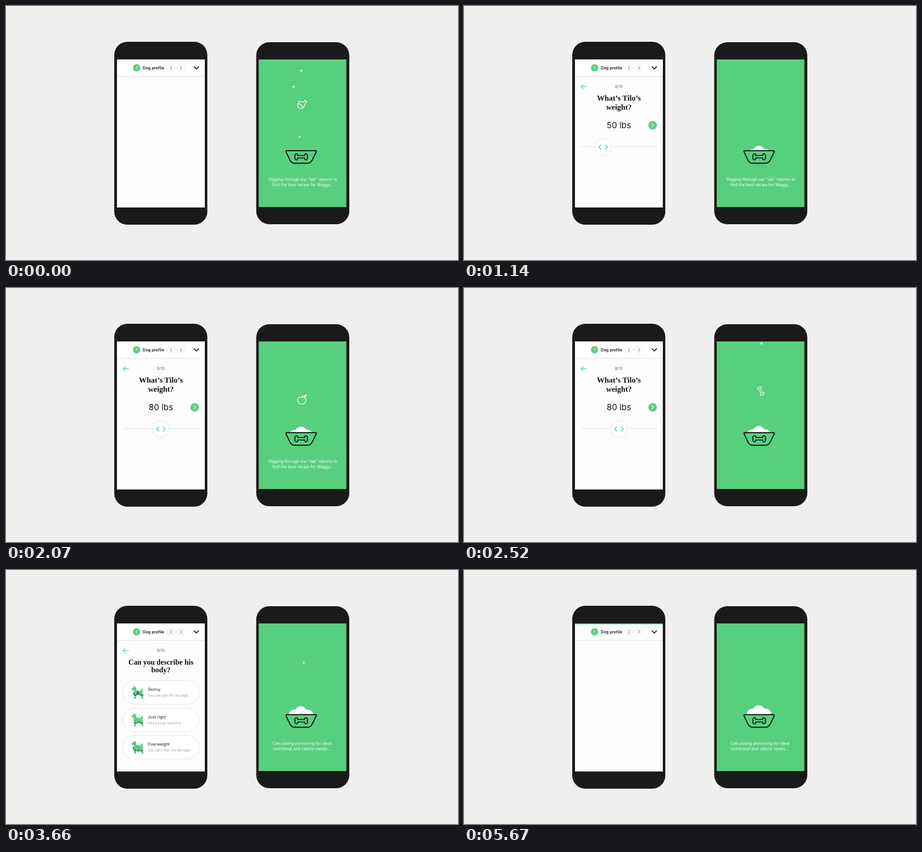
Write an HTML page that moves like this. It is 998 px wide and 561 px high and loops after 5.76 s.

```html
<!DOCTYPE html>
<html lang="en">
<head>
<meta charset="utf-8">
<title>Dog profile</title>
<style>
  html, body { margin: 0; width: 100%; height: 100%; overflow: hidden; background: #f0efed; }
  svg { display: block; width: 100%; height: 100%; }
  text { font: 400 8.6px Inter, "Open Sans", sans-serif; letter-spacing: .18px; fill: #1a1a1a; }
  .mid { text-anchor: middle; }
  .step { font-size: 8.5px; fill: #666; letter-spacing: 0; }
  .title { font: 700 17px "Liberation Serif", serif; letter-spacing: 0; fill: #111; }
  .small { font-size: 16.2px; }
  .value { font-size: 18.5px; letter-spacing: 0; }
  .hint { font-size: 7.5px; letter-spacing: .05px; fill: #a3a3a3; }
  .note text { fill: #fff; }
  .line { fill: none; stroke-linecap: round; stroke-linejoin: round; }
  .food { stroke: #fff; stroke-width: 1.4; }
</style>
</head>
<body>
<svg viewBox="0 0 998 561" preserveAspectRatio="xMidYMid meet">
  <defs>
    <clipPath id="left"><rect x="245" y="156" width="194" height="289"/></clipPath>
    <clipPath id="air"><rect x="558" y="118" width="193.5" height="202"/></clipPath>
    <path id="bone" d="M-8-2.7H8C6.5-6.5 11-8.6 12.6-5.2C15-4.6 14.8-1 13 0C14.8 1 15 4.6 12.6 5.2C11 8.6 6.5 6.5 8 2.7H-8C-6.5 6.5-11 8.6-12.6 5.2C-15 4.6-14.8 1-13 0C-14.8-1-15-4.6-12.6-5.2C-11-8.6-6.5-6.5-8-2.7z"/>
    <path id="dog" fill="#5ccf85" stroke="#5ccf85" stroke-width=".6" stroke-linejoin="round" d="M7 0l3 4 .5 5 10 2 2-5 2.2.5-.7 7 1.5 5-1 4 2 5.5H23l-1-5-3.5-4h-7l-2 4v5h-4L7 23l-2-5 .5-6L5 9 .5 8.5V6l3-2.5z"/>
  </defs>
  <rect width="998" height="561" fill="#f0efed"/>

  <rect x="239" y="79" width="205.5" height="404" rx="29" fill="#1a1a1a"/>
  <rect x="245" y="118" width="194" height="327" fill="#fdfdfd"/>
  <rect x="245" y="118" width="194" height="37.5" fill="#fff"/>
  <path d="M245 155.5H439" stroke="#dcdcdc"/>
  <circle cx="288.3" cy="136.5" r="8" fill="#5ccf85"/>
  <g fill="#fff" stroke="#dcdcdc" stroke-width=".9">
    <path d="M372 136.5H378"/>
    <circle cx="364" cy="136.5" r="7.8"/><circle cx="386" cy="136.5" r="7.8"/>
  </g>
  <text class="step mid" x="288.3" y="139.7" style="fill:#fff">1</text>
  <text x="302" y="139.8" style="font-size:8.8px;font-weight:600;letter-spacing:.05px">Dog profile</text>
  <text class="step mid" x="364" y="139.7">2</text>
  <text class="step mid" x="386" y="139.7">3</text>
  <path class="line" d="M415.3 134.2l4.9 5 4.9-5" stroke="#1a1a1a" stroke-width="2"/>
  <rect id="bar" x="245" y="118" height="2" fill="#58cf7f"/>

  <g clip-path="url(#left)">
    <g id="back">
      <path class="line" d="M270.5 178.3H258.5M263.3 173.6L258.5 178.3L263.3 183" stroke="#5ccf85" stroke-width="1.4"/>
      <text id="count" class="step mid" x="342" y="181"></text>
    </g>
    <g id="weight">
      <text class="title mid" x="342" y="209">What’s Tilo’s</text>
      <text class="title mid" x="342" y="229">weight?</text>
      <text id="lbs" class="value mid" x="342" y="270"></text>
      <circle cx="416.5" cy="263.5" r="9.4" fill="#5ccf85"/>
      <path class="line" d="M414.7 259.7l3.8 3.8-3.8 3.8" stroke="#fff" stroke-width="1.4"/>
      <path d="M258.500 310.500H425.500" stroke="#dcdcdc" stroke-width="1.1"/>
      <g id="knob">
        <circle r="18.5" fill="#fff" stroke="#dcdcdc" stroke-width=".9"/>
        <path class="line" d="M-4.800-4.600L-9.300 0l4.500 4.600M4.800-4.600L9.300 0l-4.500 4.600" stroke="#3cbf8a" stroke-width="1.5"/>
      </g>
    </g>
    <g id="body">
      <text class="title small mid" x="342" y="209">Can you describe his</text>
      <text class="title small mid" x="342" y="226">body?</text>
      <g id="options"></g>
    </g>
  </g>

  <rect x="552.5" y="80" width="205.500" height="402" rx="29" fill="#1a1a1a"/>
  <rect x="558" y="118" width="193.500" height="326" fill="#58cf7f"/>
  <g clip-path="url(#air)">
    <g id="drops"></g>
    <g id="mound" fill="#fff">
      <circle cx="651" cy="312" r="13.200"/>
      <circle cx="638" cy="320" r="14"/><circle cx="665" cy="320" r="14"/>
      <rect x="638" y="312" width="27" height="30"/>
    </g>
  </g>
  <path d="M620.500 319.500H682.800Q686 319.500 684.800 322.500L676 340.500Q672.500 347.200 665.500 347.200H637.500Q630.500 347.200 627 340.500L618.500 322.500Q617.300 319.500 620.500 319.500z" fill="#58cf7f" stroke="#161a18" stroke-width="2.500"/>
  <use href="#bone" class="line" x="651.700" y="333" stroke="#161a18" stroke-width="2.100"/>
  <g class="note mid">
    <g id="dig">
      <text x="655.700" y="385.700">Digging through our “lab” reports to</text>
      <text x="655.700" y="397.700">find the best recipe for Waggy...</text>
    </g>
    <g id="calc">
      <text x="653.500" y="385.700">Calculating portioning for ideal</text>
      <text x="653.500" y="397.700">nutritional and caloric needs...</text>
    </g>
  </g>
</svg>
<script>
const LOOP = 5760, STEP = 30, SPEED = 0.277, BOWL_X = 650, BOWL_Y = 320;
const $ = id => document.getElementById(id);
const clamp = v => Math.min(1, Math.max(0, v));
const ramp = (t, a, b) => clamp((t - a) / (b - a));
const ease = k => k * k * (3 - 2 * k);
const easeOut = k => 1 - (1 - k) ** 3;

const shapes = {
  dot: '<circle r="2.2" fill="#fff"/>',
  ring: '<circle r="1.7" class="line" stroke="#fff" stroke-width="1.300"/>',
  chicken: '<path class="line food" d="M-6-6.500C-2-3.500 1-6 4-5.500L6.500-9.500L7.500-6.500L10.500-5L6-2C6.500 3 3 8.500-2 9C-7 9.500-10.500 8-9.800 3C-9.500-1-8.500-3-7.500-6.500zM-8-1.500C-3 0 1 4 1.500 7.500"/>',
  carrot: '<path class="line food" d="M-3.500-5.500C1-9 4.500-5 5.500-1.500L9.500 13Q9.500 14.500 8 13.500L-2.500 3C-5 .500-5.500-3-3.500-5.500zM-3.500-6L-9.500-10M-3-6.500L-6-14M-2-7L-2.500-13M-1 1.500L2-.500M4.500 2L2 4M3 8L5.500 6.500"/>',
  apple: '<path class="line food" d="M0-5C-5-9-10-5-9 1C-8.500 6-5 10-2 9Q0 8 2 9C6 10 9.500 4 9 0C8.500-5 4-8 0-5zM0-5Q0-8 3-10"/><path d="M4-6Q4-12 11-12Q11-6 4-6z" fill="#fff"/>',
  bone: '<use href="#bone" class="line" stroke="#fff" stroke-width="1.900" transform="rotate(66) scale(.68)"/>',
  steak: '<path class="line food" d="M-9.500 1C-9.500-6-2-9 4-8.500C9-8.500 11-5 9.500-1C8 2 6 3 3.500 6C0 10-9.500 9-9.500 1zM-9 4C-6 9 0 8 3 4C5 1 9 0 9.500-3M-5 1L5-5M-1-5L2 1M-5-2L-2 3M3-6L5-2"/>'
};

// shape, x and y at time t
const drops = [
  ['dot', 652, 143, 0], ['ring', 635, 178.500, 0], ['chicken', 654, 217, 0], ['ring', 648.500, 289, 0],
  ['dot', 643.500, 166, 570], ['carrot', 650, 231, 570],
  ['apple', 658, 131, 1650], ['dot', 657, 201.500, 1650], ['dot', 649, 245.500, 1650],
  ['bone', 655.300, 227.500, 2520], ['ring', 657, 122.500, 2520],
  ['steak', 649, 279.500, 3210], ['ring', 652.500, 188.500, 3210],
  ['dot', 657, 205, 3660], ['chicken', 652, 187, 4200]
].map(([shape, x, y, at]) => {
  $('drops').insertAdjacentHTML('beforeend', `<g>${shapes[shape]}</g>`);
  return { el: $('drops').lastChild, x, y, at };
});

[
  ['Skinny', 'You can see the rib cage', 'M4 15l2 5h5q2-4 7-1l5 2 3-1M13 13v4M16 13v4'],
  ['Just right', 'Has a clear waistline', 'M6 21h6q4-4 8 0l5 .500'],
  ['Overweight', 'You can’t feel the rib cage', 'M4 13q-1 8 7 9l9 .500 5-1M13 20h5']
].forEach(([name, hint, belly], i) => {
  $('options').insertAdjacentHTML('beforeend', `<g transform="translate(258 ${244.500 + i * 60.500})">
    <rect width="168" height="52" rx="26" fill="#fff" stroke="#dcdcdc" stroke-width=".900"/>
    <g transform="translate(19 11.800)"><use href="#dog"/><path class="line" d="${belly}" stroke="#161a18" stroke-width="1.200"/></g>
    <text x="55" y="22.500">${name}</text><text class="hint" x="55" y="35.500">${hint}</text></g>`);
});
const chosen = $('options').children[1].querySelector('rect');

const rises = [
  [280, 400, 14], [1230, 1500, 2.500], [2260, 2400, 1.500],
  [2780, 2950, 2.500], [3300, 3450, 1.500], [4560, 4770, 2]
];

function show(el, alpha, dx = 0) {
  el.setAttribute('opacity', alpha);
  el.setAttribute('transform', `translate(${dx} 0)`);
}

function draw(t) {
  const enter = easeOut(ramp(t, 30, 330));
  const swap = ramp(t, 3195, 3510);
  const live = t < 5670;
  show($('back'), live ? enter : 0);
  show($('weight'), enter * (1 - ramp(t, 3210, 3390)), 12 * (1 - enter));
  show($('body'), live ? swap : 0, 11 * (1 - ease(swap)));
  $('count').textContent = t < 3300 ? '8/10' : '9/10';

  const lbs = 50 + 30 * ease(ramp(t, 1230, 1620)) - 18 * ease(ramp(t, 2550, 2850));
  $('lbs').textContent = Math.round(lbs) + ' lbs';
  $('knob').setAttribute('transform', `translate(${307.500 + (lbs - 50) * 1.150} 311.700)`);

  const bar = t < 3390 ? ramp(t, 2850, 3120) : ramp(t, 5010, 5280);
  $('bar').setAttribute('width', 194 * ease(bar));
  chosen.setAttribute('stroke', t < 5010 ? '#dcdcdc' : '#5ccf85');

  for (const d of drops) {
    const y = d.y + SPEED * (t - d.at);
    const x = BOWL_X + (d.x - BOWL_X) * Math.max(0, (BOWL_Y - y) / (BOWL_Y - d.y));
    d.el.setAttribute('display', y > 95 && y < 340 ? 'inline' : 'none');
    d.el.setAttribute('transform', `translate(${x} ${y})`);
  }
  const sink = rises.reduce((s, [a, b, h]) => s - h * ease(ramp(t, a, b)), 24);
  $('mound').setAttribute('transform', `translate(0 ${sink})`);

  show($('dig'), 1 - ramp(t, 2190, 2430));
  show($('calc'), ramp(t, 2505, 2790));
}

const start = performance.now();
function tick() {
  const t = (performance.now() - start) % LOOP;
  draw(Math.floor(t / STEP) * STEP);
  requestAnimationFrame(tick);
}
tick();
</script>
</body>
</html>
```
